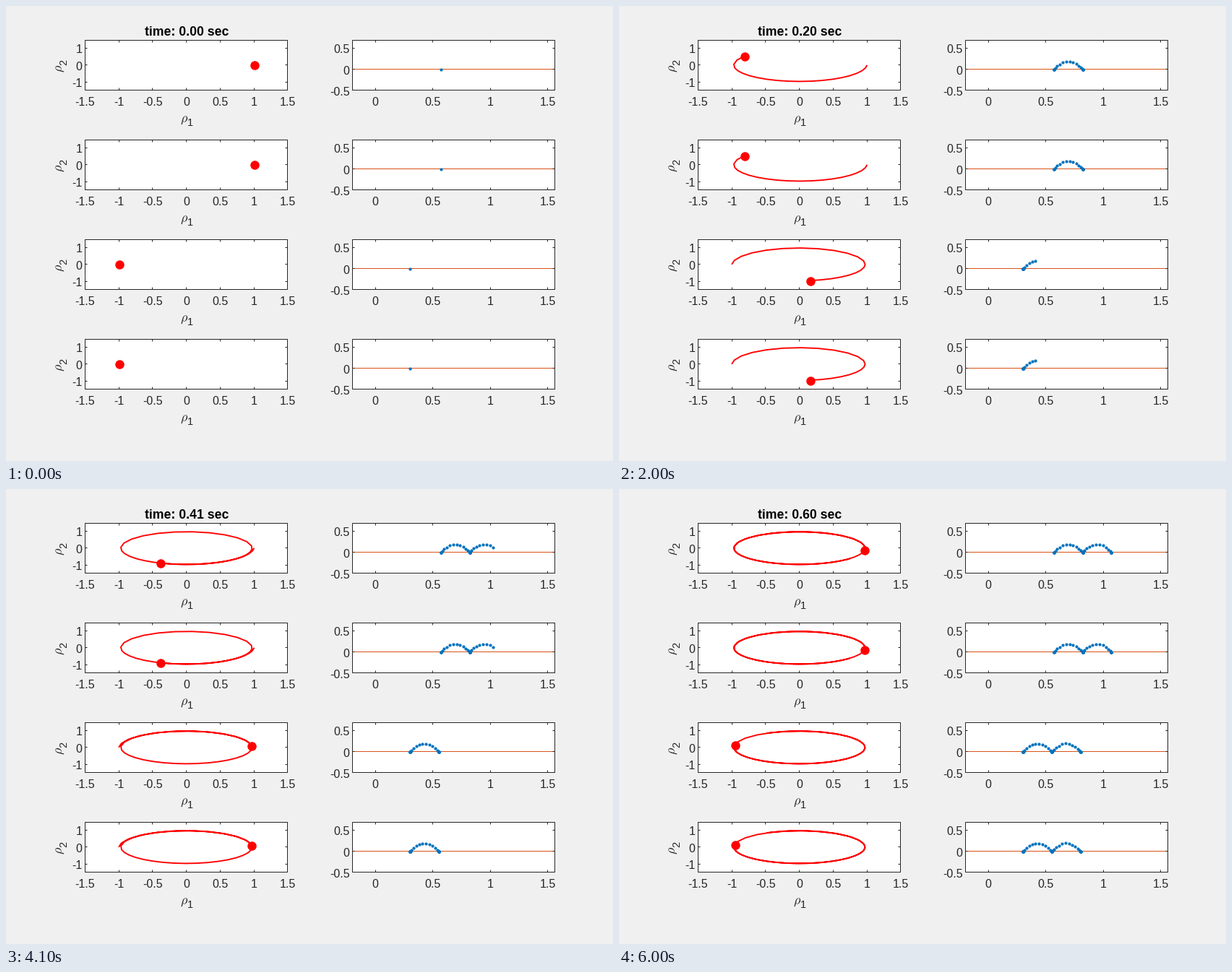
A matplotlib script for the animation above (6.1 s loop, 840 by 630 pixels).

```python
import numpy as np
import matplotlib.pyplot as plt
from matplotlib.animation import FuncAnimation
from matplotlib.patches import Rectangle

W, H, DPI = 840, 630, 100
PX = 72 / DPI  # points per pixel
FRAMES = 61
TRAIL = 57     # samples kept in the phase trail
INK = "#262626"
BLUE = "#0072bd"
GROUND = "#d95319"

plt.rcParams["font.family"] = "Liberation Sans"
plt.rcParams["mathtext.fontset"] = "cm"
plt.rcParams["path.snap"] = False

fig = plt.figure(figsize=(W / DPI, H / DPI), dpi=DPI, facecolor="#f0f0f0")
stage = fig.add_axes([0, 0, 1, 1])
stage.set_xlim(0, W)
stage.set_ylim(H, 0)
stage.axis("off")


def pixel(v):
    """Centre of the pixel that holds v."""
    return np.floor(v) + 0.5


def text(x, y, s, size=16, **kw):
    kw = {"color": INK, "ha": "center", "va": "baseline", **kw}
    return stage.text(x, y, s, fontsize=size * PX, **kw)


def line(x, y, color, width=1.0, **kw):
    return stage.plot(x, y, color=color, lw=width * PX,
                      solid_capstyle="butt", **kw)[0]


def dots(color, diameter, zorder):
    return stage.scatter([], [], s=(diameter * PX) ** 2, color=color,
                         linewidths=0, zorder=zorder)


class Panel:
    """A boxed plot with inward ticks, placed in stage pixels."""

    def __init__(self, left, top, xlim, ylim, xticks, yticks):
        self.x0, self.y0 = left + 0.2, top - 0.2
        self.xlim, self.ylim = xlim, ylim
        self.left, self.right = left + 0.5, left + 280.5
        self.top, self.bottom = top + 0.5, top + 69.5
        stage.add_patch(Rectangle((self.left, self.top), 280, 69, fc="white",
                                  ec=INK, lw=PX, zorder=1))
        for v in xticks:
            x = np.clip(pixel(self.x(v)), self.left, self.right)
            line([x, x], [self.bottom, self.bottom - 3], INK, zorder=4)
            line([x, x], [self.top, self.top + 3], INK, zorder=4)
            text(self.x(v), top + 91, f"{v:g}")
        for v in yticks:
            y = np.clip(pixel(self.y(v)), self.top, self.bottom)
            line([self.left, self.left + 3], [y, y], INK, zorder=4)
            line([self.right, self.right - 3], [y, y], INK, zorder=4)
            text(self.left - 4, self.y(v) + 7, f"{v:g}", ha="right")

    def x(self, v):
        lo, hi = self.xlim
        return self.x0 + 281 * (v - lo) / (hi - lo)

    def y(self, v):
        lo, hi = self.ylim
        return self.y0 + 70 * (hi - v) / (hi - lo)


# Oscillator: slow through the lower half-turn, fast through the upper one
SLOW, FAST = 10.0, 15.4  # degrees per frame
ENTER, LEAVE = 175, 356
T_SLOW = (ENTER - LEAVE + 360) / SLOW
PERIOD = T_SLOW + (LEAVE - ENTER) / FAST
k = np.arange(FRAMES)


def phase(shift, start):
    turns, rest = np.divmod(k + shift, PERIOD)
    theta = 360 * turns + np.interp(rest, [0, T_SLOW, PERIOD],
                                    [LEAVE - 360, ENTER, LEAVE])
    theta[0] = start
    return theta


def orbit(theta):
    r = 0.97 + 0.03 * np.exp(-k / 2.5)
    a = np.radians(theta)
    return r * np.cos(a), -r * np.sin(a)


def foot(theta, x0):
    turns, rest = np.divmod(theta + 4, 360)
    swing = np.radians(np.clip(1.4 * (rest - 26), 0, 180))
    p = (1 - np.cos(swing)) / 2
    steps = turns + p
    return x0 + 0.249 * (steps - steps[0]), 0.8 * p * (1 - p)


front = (phase(0.4, 0), 0.568)
back = (phase(T_SLOW + 3.5 / FAST, 180), 0.30)

legs = []
for row, (theta, x0) in enumerate([front, front, back, back]):
    top = 47 + 138 * row
    osc = Panel(109, top, (-1.5, 1.5), (-1.5, 1.5),
                np.arange(-1.5, 1.6, 0.5), [-1, 0, 1])
    step = Panel(479, top, (-0.2, 1.565), (-0.5, 0.7),
                 [0, 0.5, 1, 1.5], [-0.5, 0, 0.5])

    text(241, top + 113.5, r"$\rho$", 18, ha="left")
    text(250.5, top + 118.5, "1", 14.5, ha="left")
    turned = dict(rotation=90, rotation_mode="anchor", ha="left")
    text(78, top + 44.5, r"$\rho$", 18, **turned)
    text(84.5, top + 35, "2", 14.5, **turned)

    line([step.left, step.right], [pixel(step.y(0))] * 2, GROUND, zorder=2)
    ox, oy = orbit(theta)
    fx, fy = foot(theta, x0)
    path = np.column_stack([osc.x(ox), osc.y(oy)])
    legs.append({
        "path": path,
        "spots": pixel(path),
        "feet": pixel(np.column_stack([step.x(fx), step.y(fy)])),
        "trail": line([], [], "red", 1.9, zorder=5, solid_joinstyle="round"),
        "head": dots("red", 12.5, 6),
        "prints": dots(BLUE, 4.2, 5),
    })

title = text(250, 41, "", 17.6, color="black", weight="bold")


def draw(i):
    title.set_text(f"time: {i / 100:.2f} sec")
    first = max(0, i + 1 - TRAIL)
    for leg in legs:
        leg["trail"].set_data(*leg["path"][first:i + 1].T)
        leg["head"].set_offsets(leg["spots"][i:i + 1])
        leg["prints"].set_offsets(leg["feet"][:i + 1])
    return [title]


anim = FuncAnimation(fig, draw, frames=FRAMES, interval=100, repeat=True,
                     repeat_delay=0, blit=False)
plt.show()
```
